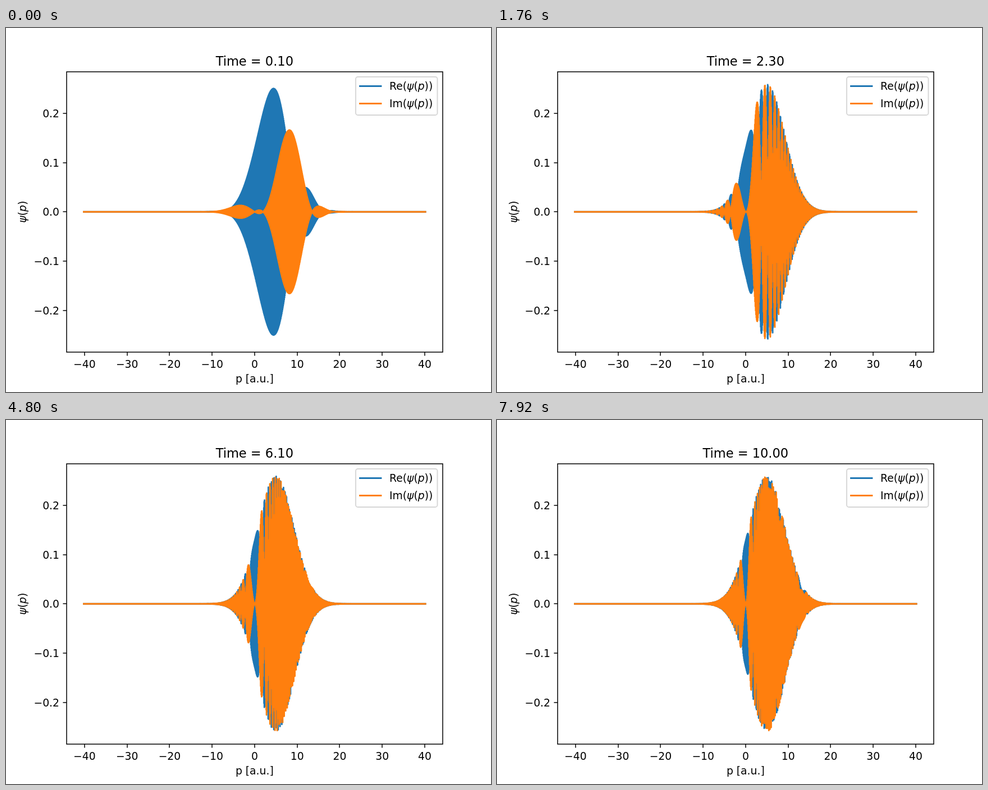
Animation of 864x648 px, one loop 8000 ms. Source, as an HTML page with a canvas:

```html
<!DOCTYPE html>
<html lang="en">
<head>
<meta charset="utf-8">
<title>Momentum wave packet</title>
<style>
  html, body { margin: 0; width: 100%; height: 100%; overflow: hidden; background: #fff; }
  canvas { display: block; width: 864px; height: 648px; }
</style>
</head>
<body>
<canvas id="plot" width="864" height="648"></canvas>
<script>
const ctx = document.getElementById('plot').getContext('2d');
const BLUE = '#1f77b4', ORANGE = '#ff7f0e';
const PT = 1.875, FONT = '"DejaVu Sans", sans-serif';
const STEP = 80, STEPS = 100;

// Momentum grid of a discrete Fourier transform over x in [-80, 80]
const N = 2048, DX = 160 / (N - 1), DP = 2 * Math.PI / (N * DX);
// Gaussian packet centred at P0
const P0 = 5, DECAY = 0.028, PEAK = 0.2585;

const box = { l: 108, r: 777.6, t: 77.76, b: 576.72 };
const unitX = (box.r - box.l) / 1.1 / ((N - 1) * DP);
const zeroX = box.l + (box.r - box.l) / 22 + N / 2 * DP * unitX;
const zeroY = (box.t + box.b) / 2;
const unitY = (box.b - box.t) / 2 / (1.1 * PEAK);
const toX = p => zeroX + p * unitX;
const toY = v => zeroY - v * unitY;

function line(x1, y1, x2, y2) {
  ctx.beginPath();
  ctx.moveTo(x1, y1);
  ctx.lineTo(x2, y2);
  ctx.stroke();
}

function text(str, x, y, align, size = 10) {
  ctx.font = `${size * PT}px ${FONT}`;
  ctx.textAlign = align;
  ctx.fillText(str, x, y);
}

// Runs of text; every second run is italic
function mathText(runs, x, y, centered) {
  const fontOf = i => `${i % 2 ? 'italic ' : ''}${10 * PT}px ${FONT}`;
  const widths = runs.map((run, i) => {
    ctx.font = fontOf(i);
    return ctx.measureText(run).width;
  });
  if (centered) x -= widths.reduce((a, b) => a + b, 0) / 2;
  ctx.textAlign = 'left';
  runs.forEach((run, i) => {
    ctx.font = fontOf(i);
    ctx.fillText(run, x, y);
    x += widths[i];
  });
}

function curve(color, part, time) {
  const chirp = 0.1 * (time + 0.1);
  ctx.beginPath();
  for (let k = -N / 2; k < N / 2; k++) {
    const p = k * DP;
    const phase = p * DX / 2 - chirp * p * p;
    const sign = k % 2 ? -1 : 1;
    const v = sign * PEAK * Math.exp(-DECAY * (p - P0) ** 2) * part(phase);
    ctx.lineTo(toX(p), toY(v));
  }
  ctx.strokeStyle = color;
  ctx.lineWidth = 1.5 * PT;
  ctx.lineJoin = 'round';
  ctx.lineCap = 'square';
  ctx.stroke();
}

function axes() {
  ctx.strokeStyle = ctx.fillStyle = '#000';
  ctx.lineWidth = 0.8 * PT;
  ctx.lineJoin = 'miter';
  ctx.lineCap = 'butt';
  ctx.strokeRect(108, 78, 670, 499);
  const label = (v, digits) => (v < 0 ? '\u2212' : '') + Math.abs(v).toFixed(digits);
  for (let p = -40; p <= 40; p += 10) {
    const x = Math.round(toX(p));
    line(x, 577, x, 577 + 3.5 * PT);
    text(label(p, 0), toX(p), 605, 'center');
  }
  for (let i = -2; i <= 2; i++) {
    const y = Math.round(toY(i / 10));
    line(108, y, 108 - 3.5 * PT, y);
    text(label(i / 10, 1), 95, y + 7, 'right');
  }
  text('p [a.u.]', 442.8, 631, 'center');
  ctx.save();
  ctx.translate(36, zeroY);
  ctx.rotate(-Math.PI / 2);
  mathText(['', 'ψ', '(', 'p', ')'], 0, 0, true);
  ctx.restore();
}

function legend() {
  ctx.beginPath();
  ctx.roundRect(623, 87, 145.5, 68, 3.75);
  ctx.fillStyle = 'rgba(255,255,255,.8)';
  ctx.fill();
  ctx.strokeStyle = 'rgba(204,204,204,.8)';
  ctx.lineWidth = PT;
  ctx.stroke();
  [['Re(', BLUE], ['Im(', ORANGE]].forEach(([name, color], i) => {
    const y = 103.5 + 31 * i;
    ctx.strokeStyle = color;
    ctx.lineWidth = 1.5 * PT;
    ctx.lineCap = 'square';
    line(630.5, y, 668, y);
    ctx.fillStyle = '#000';
    mathText([name, 'ψ', '(', 'p', '))'], 683, y + 6.5);
  });
}

function draw(step) {
  const time = (step + 1) / 10;
  ctx.fillStyle = '#fff';
  ctx.fillRect(0, 0, 864, 648);
  curve(BLUE, Math.cos, time);
  curve(ORANGE, Math.sin, time);
  axes();
  text(`Time = ${time.toFixed(2)}`, 442.8, 67, 'center', 12);
  legend();
}

const start = performance.now();
let shown = -1;
function tick() {
  const step = Math.floor((performance.now() - start) / STEP) % STEPS;
  if (step !== shown) draw(shown = step);
  requestAnimationFrame(tick);
}
tick();
</script>
</body>
</html>
```
